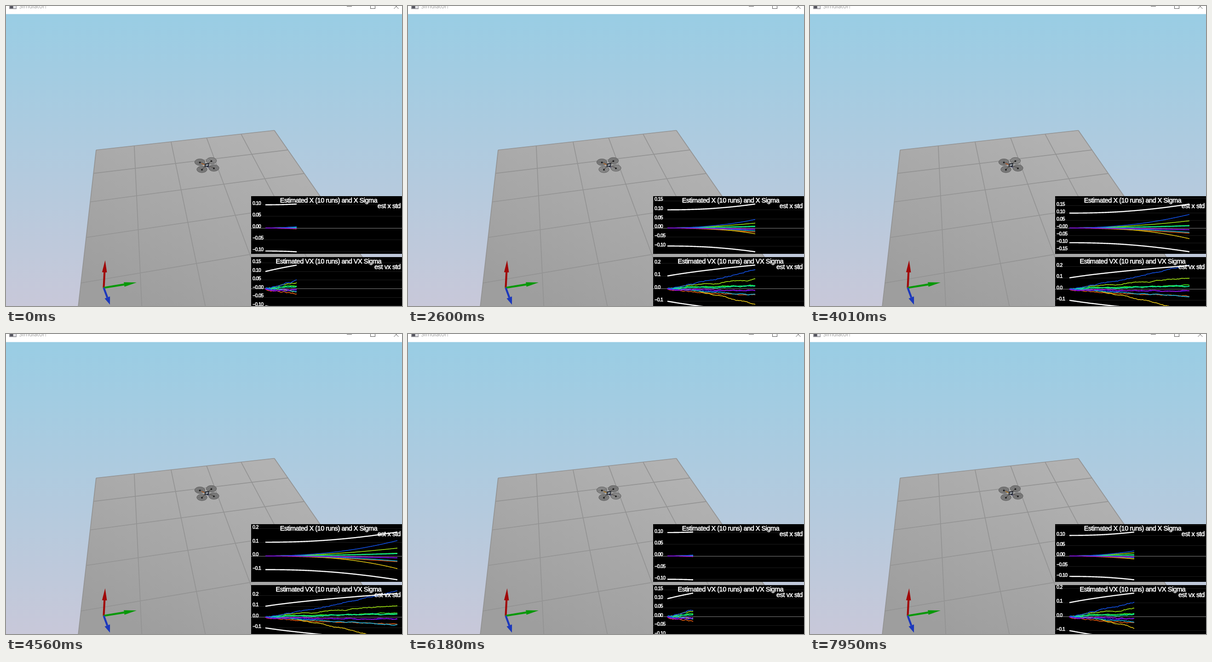
These frames come from a looping animation (861x650 px, 8 s). An HTML page with a canvas:

```html
<!DOCTYPE html>
<html lang="en">
<head>
<meta charset="utf-8">
<title>Simulator</title>
<style>
  html, body { margin: 0; width: 100%; height: 100%; overflow: hidden; background: #fff; }
  canvas { display: block; }
</style>
</head>
<body>
<canvas id="stage" width="861" height="650"></canvas>
<script>
const ctx = document.getElementById('stage').getContext('2d');
const W = 861, H = 650, LOOP = 8000;
const STEP = 77.2;               // ms between simulator frames
const SPEED = 48;                // plot pixels per second
const HEAD = 1437, RESET = 5003; // run age at loop start, time of restart
const PLOT_X = 564, PANEL_X = 533, PANEL_H = 125;
const SAMPLES = 312;

function seeded(seed) {
  return () => {
    seed = (seed * 1664525 + 1013904223) >>> 0;
    return seed / 4294967296;
  };
}

function line(points, color, width) {
  ctx.beginPath();
  points.forEach(([x, y]) => ctx.lineTo(x, y));
  ctx.strokeStyle = color;
  ctx.lineWidth = width;
  ctx.stroke();
}

function shape(points, color) {
  ctx.beginPath();
  points.forEach(([x, y]) => ctx.lineTo(x, y));
  ctx.closePath();
  ctx.fillStyle = color;
  ctx.fill();
}

function gradient(x0, y0, x1, y1, from, to) {
  const g = ctx.createLinearGradient(x0, y0, x1, y1);
  g.addColorStop(0, from);
  g.addColorStop(1, to);
  return g;
}

// Each run drifts as end * (t / 5.44) ^ power, plus a seeded wander
function makeRun([end, power], i) {
  const rnd = seeded(91 + i * 7919);
  const vel = [], pos = [];
  let noise = 0, x = 0;
  for (let s = 0; s <= SAMPLES; s++) {
    noise = noise * 0.94 + (rnd() - 0.5) * 0.004;
    vel.push(end * (s / SPEED / 5.44) ** power + noise);
    x += vel[s] / SPEED / 6;
    pos.push(x);
  }
  return { color: `hsl(${22 + i * 28.6}, 86%, 47%)`, vel, pos };
}
const RUNS = [
  [-0.06, 0.6], [-0.205, 1.6], [0.097, 0.8], [0.03, 0.7], [0.025, 0.5],
  [0.028, 0.8], [-0.068, 1], [0.217, 1.15], [-0.018, 0.3], [-0.016, 0.2]
].map(makeRun);

const sigmaX = t => Math.sqrt(0.01 + 0.00027 * t * t + 0.00005 * t ** 3);
const sigmaV = t => Math.sqrt(0.01 + 0.0062 * t);

function text(str, x, y, size, align, spacing) {
  ctx.font = size + 'px "Liberation Sans", Arial, sans-serif';
  ctx.textAlign = align;
  ctx.textBaseline = 'alphabetic';
  ctx.letterSpacing = spacing + 'px';
  ctx.fillStyle = ctx.strokeStyle = '#fff';
  ctx.lineWidth = 0.6;
  ctx.fillText(str, x, y);
  ctx.strokeText(str, x, y);
  ctx.letterSpacing = '0px';
}

function ticks(top, zero, scale) {
  const step = PANEL_H / scale > 0.4 ? 0.1 : 0.05;
  const digits = step === 0.1 ? 1 : 2;
  const low = Math.ceil((zero - top - PANEL_H) / scale / step);
  const high = Math.floor((zero - top) / scale / step);
  for (let n = low; n <= high; n++) {
    const y = zero - n * step * scale;
    ctx.fillStyle = n ? '#1c1c1c' : '#828282';
    ctx.fillRect(PANEL_X, Math.round(y), W - PANEL_X, 1);
    if (y < top + 5.5 || y > top + PANEL_H - 5) continue;
    // accumulated rounding shows zero as negative when ticks begin at -0.15
    const minus = n < 0 || (n === 0 && digits === 2 && low === -3);
    text((minus ? '\u2212' : '') + Math.abs(n * step).toFixed(digits), 536, y + 0.8, 10.5, 'left', -0.6);
  }
}

function chart(top, zero, title, legend, key, sigma, age, reach) {
  const end = Math.min(age * SPEED, SAMPLES);
  const scale = reach / sigma(age);
  ctx.save();
  ctx.beginPath();
  ctx.rect(PANEL_X, top, W - PANEL_X, PANEL_H);
  ctx.clip();
  ctx.fillStyle = '#000';
  ctx.fillRect(PANEL_X, top, W - PANEL_X, PANEL_H);
  ticks(top, zero, scale);
  const curve = (at, color, width) => {
    const pts = [];
    for (let s = 0; s <= end; s++) pts.push([PLOT_X + s, zero + 0.3 - at(s) * scale]);
    line(pts, color, width);
  };
  ctx.lineJoin = 'round';
  for (const run of RUNS) curve(s => run[key][s], run.color, 1.6);
  curve(s => sigma(s / SPEED), '#fff', 2.4);
  curve(s => -sigma(s / SPEED), '#fff', 2.4);
  text(title, 701.5, top + 13.5, 14.5, 'center', -0.48);
  text(legend, 858, top + 25.8, 14.5, 'right', -0.42);
  ctx.restore();
}

function titleBar() {
  ctx.fillStyle = '#fff';
  ctx.fillRect(0, 0, W, 17.5);
  ctx.fillStyle = '#8c8c92';
  ctx.fillRect(7, 0, 16, 6.5);
  ctx.fillStyle = '#55555f';
  ctx.fillRect(9, 0, 6, 5);
  ctx.fillStyle = '#e4e4e8';
  ctx.fillRect(16, 0, 6, 5);
  ctx.font = '12.4px "Open Sans", sans-serif';
  ctx.textAlign = 'left';
  ctx.textBaseline = 'alphabetic';
  ctx.fillStyle = '#999';
  ctx.fillText('Simulator!', 28.5, 5);
  line([[741, 0.5], [752, 0.5]], '#555', 1);
  ctx.strokeRect(792.5, -4.5, 10, 10);
  line([[843.5, 6], [853.5, -4]], '#555', 1);
  line([[853.5, 6], [843.5, -4]], '#555', 1);
}

// Perspective view of floor tile corner (u, v)
function project(u, v) {
  const depth = 1 + 0.0175 * u - 0.0898 * v;
  return [(196 + 87.7 * u - 22.89 * v) / depth, (312 - 3.78 * u + 18.14 * v) / depth];
}

function ground() {
  const tiles = 5;
  const corners = [[0, 0], [tiles, 0], [tiles, tiles], [0, tiles]].map(c => project(...c));
  shape(corners, gradient(520, 270, 330, 660, '#b2b2b2', '#9e9e9e'));
  for (let i = 0; i <= tiles; i++) {
    line([project(i, 0), project(i, tiles)], '#939393', 1.7);
    line([project(0, i), project(tiles, i)], '#939393', 1.7);
  }
}

function arrow(tipX, tipY, head, half, color) {
  const x = 212.5, y = 610.5;
  const len = Math.hypot(tipX - x, tipY - y);
  const dx = (tipX - x) / len, dy = (tipY - y) / len;
  const bx = tipX - dx * head, by = tipY - dy * head;
  line([[x, y], [bx, by]], color, 4.2);
  shape([[bx - dy * half, by + dx * half], [tipX, tipY], [bx + dy * half, by - dx * half]], color);
}

function drone(frame) {
  const rnd = seeded(frame * 7351 + 17);
  rnd();
  const rotors = [[421.5, 338.3], [446.5, 335.3], [452, 351], [426, 354]];
  for (const [x, y] of rotors) {
    const spin = rnd() * Math.PI;
    const dx = Math.cos(spin) * 11, dy = Math.sin(spin) * 7;
    ctx.beginPath();
    ctx.ellipse(x, y, 11.2, 7.1, 0, 0, Math.PI * 2);
    ctx.fillStyle = rnd() > 0.7 ? '#868686' : '#787878';
    ctx.fill();
    ctx.strokeStyle = '#5e5e5e';
    ctx.lineWidth = 1;
    ctx.stroke();
    line([[x - dx, y - dy], [x + dx, y + dy]], '#6e6e6e', 1);
  }
  line([rotors[0], rotors[2]], '#55504c', 1.1);
  line([rotors[1], rotors[3]], '#55504c', 1.1);
  line([[425, 341], [432, 344]], `hsl(${10 + rnd() * 30}, 60%, 45%)`, 1.5);
  line([[437, 348.5], [442, 349]], '#34345c', 1.3);
  ctx.fillStyle = '#1c1c1c';
  for (const [x, y] of rotors) ctx.fillRect(x - 1.7, y - 0.8, 3.4, 3.2);
  shape([[432.5, 341.3], [442, 340.6], [440.8, 348], [431.5, 348.6]], '#20242c');
  shape([[434.5, 343.2], [440, 342.8], [439, 346], [433.8, 346.4]], '#a4acb6');
}

function draw(time) {
  const frame = Math.floor((time + 18) / STEP);
  const now = frame * STEP;
  const age = (now < RESET ? now + HEAD : now - RESET) / 1000;
  ctx.fillStyle = gradient(0, 17, 0, H, '#99cde4', '#c8c8d9');
  ctx.fillRect(0, 0, W, H);
  titleBar();
  ground();
  arrow(215.5, 551, 26, 5.3, '#a00808');
  arrow(284, 599, 27.5, 5, '#089808');
  arrow(226, 647, 16.5, 6.2, '#1c38bc');
  drone(frame);
  chart(412, 480.5, 'Estimated X (10 runs) and X Sigma', 'est x std', 'pos', sigmaX, age, 51.8);
  chart(544, age > 5 ? 613 : 612, 'Estimated VX (10 runs) and VX Sigma', 'est vx std', 'vel', sigmaV, age, 51);
}

const start = performance.now();
function tick() {
  draw((performance.now() - start) % LOOP);
  requestAnimationFrame(tick);
}
tick();
</script>
</body>
</html>
```
